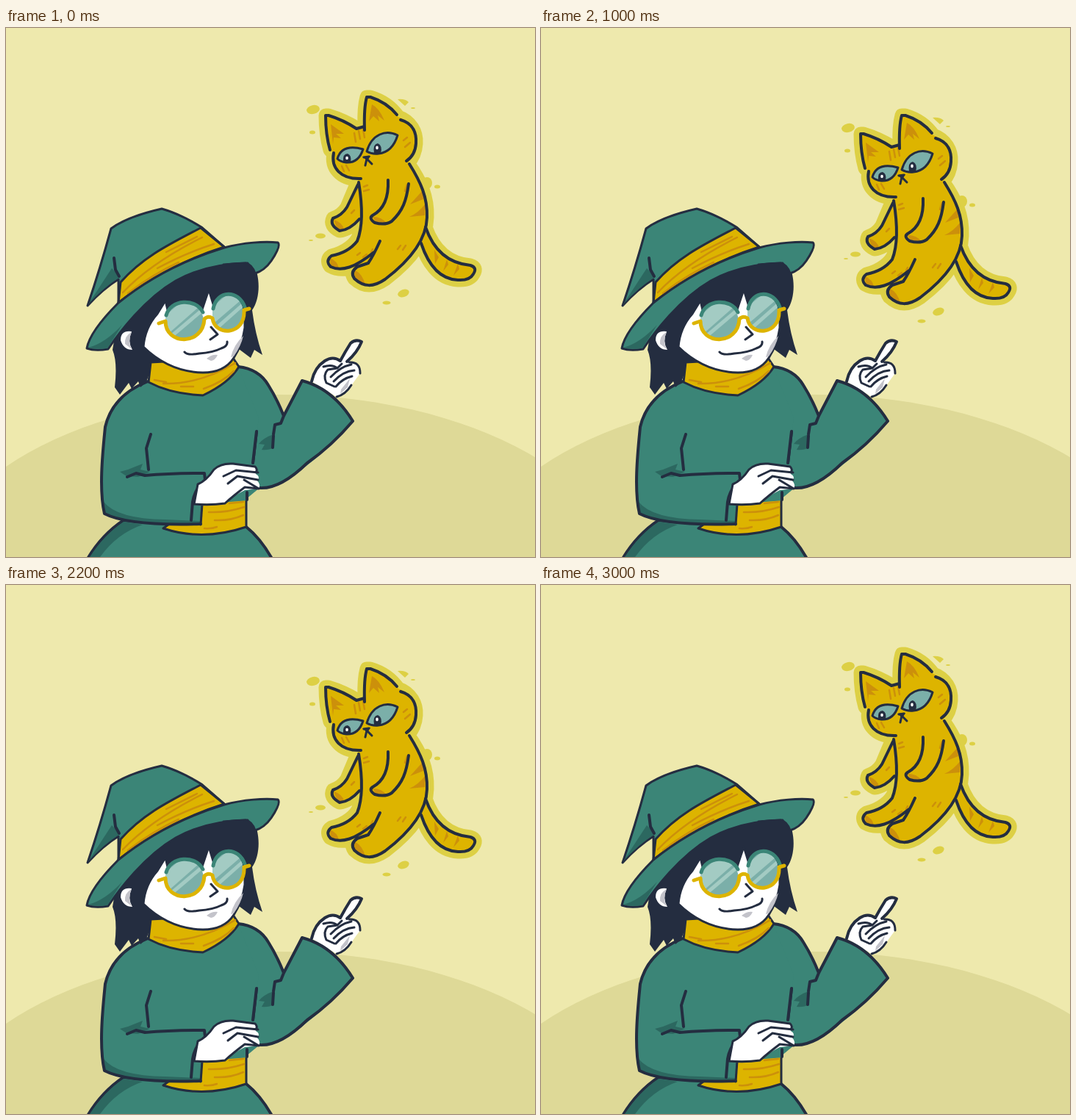
An HTML page for the animation above (3.2 s loop, 720 by 720 pixels).

```html
<!DOCTYPE html>
<html lang="en">
<head>
<meta charset="utf-8">
<title>Levitating cat</title>
<style>
  html, body { margin: 0; width: 100%; height: 100%; overflow: hidden; background: #eee9ad; }
  svg { display: block; width: 100%; height: 100%; }
  path, ellipse { stroke-linecap: round; stroke-linejoin: round; }
  .ink { stroke: #242d40; stroke-width: 4; }
  .line { fill: none; stroke: #242d40; stroke-width: 4; }
  .thin { stroke-width: 3; }
  .teal { fill: #3b8577; }
  .shade { fill: #2c6860; }
  .gold { fill: #ddb400; }
  .rust { fill: #cc900b; }
  .scratch { fill: none; stroke: #cc900b; stroke-width: 2.5; }
  .dark { fill: #242d40; }
  .white { fill: #fff; }
  .grey { fill: #c3c3ca; }
  .lens { fill: #7bafa9; }
  .glint { fill: none; stroke: #a3cbc3; }
  .rim { fill: none; stroke-width: 5; }
  .aura { fill: #ddd045; }
  .halo { stroke: #ddd045; stroke-width: 19; }
  #cat { animation: float 3.2s step-end infinite; }
  @keyframes float {
    0%, 93.75%, 100% { transform: translateY(0); }
    6.25%, 87.5% { transform: translateY(4px); }
    12.5%, 81.25% { transform: translateY(8px); }
    18.75%, 75% { transform: translateY(15px); }
    25%, 68.75% { transform: translateY(20px); }
    31.25%, 62.5% { transform: translateY(25px); }
    37.5%, 56.25% { transform: translateY(30px); }
    43.75% { transform: translateY(35px); }
  }
</style>
</head>
<body>
<svg viewBox="0 0 720 720">
  <defs>
    <g id="silhouette">
      <path d="M441 166Q435 145 435 119L439 119Q459 125 477 136L488 134Q487 108 491 94L496 94Q520 101 534 121C551 127 559 142 558 157Q557 173 547 184C565 209 574 230 573 258C572 292 545 320 516 342C500 353 487 353 474 341Q468 333 476 325Q455 332 441 324Q435 315 443 310C461 306 477 294 481 281L483 259Q466 275 454 276Q440 269 445 259Q457 255 464 244L480 206C455 206 442 190 446 170Z"/>
      <path d="M571 271C580 297 598 320 632 323Q642 326 636 335Q631 344 615 343C588 342 573 317 565 293Z"/>
    </g>
    <clipPath id="leftLens"><ellipse cx="243" cy="399" rx="26" ry="25"/></clipPath>
    <clipPath id="rightLens"><ellipse cx="302" cy="388" rx="21" ry="25"/></clipPath>
  </defs>

  <path fill="#eee9ad" d="M0 0H720V720H0Z"/>
  <ellipse cx="370" cy="769" rx="480" ry="270" fill="#ded997"/>

  <!-- skirt and belt -->
  <path class="teal ink" d="M110 724Q130 690 160 670L327 679Q347 695 363 724Z"/>
  <path class="shade" d="M114 720Q133 690 160 672L186 676Q151 688 128 720Z"/>
  <path class="gold ink thin" d="M214 681L262 646L327 641L327 679Q268 699 214 681Z"/>
  <path class="scratch" d="M276 659Q300 660 324 652M284 670Q305 671 323 663M270 681Q280 682 287 679M304 647L323 645"/>

  <!-- raised arm -->
  <path class="white" d="M416 481Q420 462 434 453Q445 446 455 453Q462 440 469 429Q476 423 484 427Q478 442 467 454Q482 453 482 470Q476 478 469 488Q462 499 450 502Z"/>
  <path class="grey" d="M456 492L468 477L465 489L455 498Z"/>
  <path class="line" d="M416 481Q420 462 434 453Q445 446 455 453Q462 440 469 429Q476 423 484 427Q478 442 464 454"/>
  <path class="line thin" d="M467 455Q482 454 482 470M470 486Q462 499 450 502M432 461Q444 457 451 463L457 457M451 463L438 465Q431 472 436 483L447 488M442 475Q455 461 470 458M446 481Q459 467 474 466M449 488Q458 477 471 474"/>
  <path class="teal" d="M316 461Q344 464 357 486Q369 505 378 528L403 480Q445 491 472 535Q440 573 405 599Q369 628 345 626L327 641L252 646Z"/>
  <path class="line" d="M316 461Q344 464 357 486Q369 505 378 528L374 538L366 540L364 553M378 528L403 480Q445 491 472 535Q443 569 410 592Q373 628 345 626"/>
  <path class="shade" d="M364 553Q350 558 344 566L352 567L348 574Q358 575 364 571Z"/>
  <path class="line" d="M364 555L363 571M341 549L336 592"/>

  <!-- torso and folded arm -->
  <path class="teal" d="M193 481L316 461L344 530L336 601L329 643L267 648L265 676C167 678 146 665 134 661C126 627 132 574 135 543Q145 500 193 481Z"/>
  <path class="shade" d="M133 645Q151 668 217 669L264 671V676Q161 676 134 661Z"/>
  <path class="line" d="M193 481Q145 500 135 543C132 574 126 627 134 661Q167 678 265 675M341 549L336 592M328 632V642"/>
  <path class="shade" d="M155 604L166 601L186 593L183 601L196 604L180 611L164 610Z"/>
  <path class="line" d="M197 553L191 572L194 601M165 611L177 606L189 609Q225 606 270 606L271 615Q257 627 254 645L252 670"/>
  <path class="line thin" d="M267 648L265 676"/>

  <path class="white" d="M256 648L261 621Q273 616 283 601Q292 592 309 593L339 597Q343 601 340 607Q347 611 342 616Q347 622 344 627L325 629Q309 637 298 647Z"/>
  <path class="line thin" d="M256 648L261 621Q273 616 283 601Q292 592 309 593L339 597Q343 601 340 605M344 627L325 625Q309 637 298 647Q278 650 256 648M343 605L313 602L296 610M343 615L315 610L302 620M344 627L324 615"/>

  <!-- hair, scarf and face -->
  <path class="dark" d="M148 420Q160 395 198 354Q238 314 336 320C346 336 347 367 335 384Q339 416 349 445L338 438L333 449L313 434L197 465L191 482L183 489L180 481L171 491L167 483L155 499L148 489Q152 455 145 438Z"/>
  <path class="gold ink thin" d="M197 455L194 482Q224 498 268 500Q304 483 317 461L309 449Z"/>
  <path class="scratch" d="M214 484Q264 485 312 456M269 491Q295 482 310 467M202 479L218 482M238 488L255 488"/>
  <path class="white" d="M171 413Q156 411 156 425Q160 438 172 438Q165 427 171 413Z"/>
  <path class="grey" d="M171 414Q161 419 162 430L171 437Q165 427 171 414Z"/>
  <path class="white ink thin" d="M187 434Q189 408 206 389L217 371L220 384L267 383L276 356L283 379L325 384L325 408Q322 430 310 449Q297 469 268 469Q222 468 187 434Z"/>
  <path class="grey" d="M323 419Q320 433 310 447L306 448Q310 431 323 419ZM273 450Q280 444 288 445Q285 452 279 453Z"/>
  <path class="line thin" d="M279 407L288 417L278 424M243 441Q247 446 263 443Q281 442 293 436Q302 433 301 427"/>

  <!-- glasses -->
  <g clip-path="url(#leftLens)">
    <path class="lens" d="M214 370H272V428H214Z"/>
    <path class="glint" stroke-width="21" d="M213 409L261 367"/>
    <path class="glint" stroke-width="5" d="M228 417L273 379"/>
  </g>
  <g clip-path="url(#rightLens)">
    <path class="lens" d="M277 360H328V418H277Z"/>
    <path class="glint" stroke-width="18" d="M276 396L318 360"/>
    <path class="glint" stroke-width="5" d="M287 408L329 371"/>
  </g>
  <path class="rim" stroke="#3b8577" d="M218 391C224 369 258 367 268 387M282 382C287 356 317 356 325 380"/>
  <path class="rim" stroke="#ddb400" d="M208 402L217 399C217 432 268 433 270 396Q275 391 281 395C284 420 326 419 324 384L331 382"/>

  <!-- hat -->
  <path class="teal ink thin" d="M153 374L153 342Q132 355 111 378Q128 328 143 273Q164 257 212 246Q237 253 266 271L297 298Z"/>
  <path class="shade" d="M112 376L144 327L155 339Q134 352 112 376Z"/>
  <path class="line" d="M147 313L149 329L154 338"/>
  <path class="gold ink thin" d="M153 374L156 346C187 311 223 294 265 272L297 298Q215 324 153 374Z"/>
  <path class="scratch" stroke-width="4" d="M159 360Q197 320 267 285M166 361Q200 335 235 319M206 327Q245 306 283 294M218 305Q244 292 260 284"/>
  <path class="teal ink thin" d="M153 374Q215 324 297 299C323 292 352 290 370 292Q375 296 361 317Q352 330 339 334Q335 322 326 320C290 321 258 329 231 344C188 369 153 416 139 437Q121 440 110 436Q114 413 153 374Z"/>
  <path class="shade" d="M112 435Q135 429 158 404L138 436Q123 438 112 435Z"/>
  <path class="line thin" d="M296 322Q317 320 329 320"/>

  <!-- floating cat -->
  <g id="cat">
    <g class="aura">
      <use href="#silhouette" class="halo"/>
      <ellipse cx="418" cy="111" rx="9" ry="6" transform="rotate(-12 418 111)"/>
      <ellipse cx="417" cy="142" rx="4" ry="2.5"/>
      <path d="M533 97Q543 96 548 101L543 106Z"/>
      <ellipse cx="554" cy="109" rx="3" ry="1"/>
      <ellipse cx="573" cy="211" rx="7" ry="8"/>
      <ellipse cx="587" cy="216" rx="4" ry="2.5"/>
      <ellipse cx="428" cy="283" rx="7" ry="3.5"/>
      <ellipse cx="415" cy="289" rx="3" ry="1"/>
      <ellipse cx="541" cy="361" rx="8" ry="5" transform="rotate(-20 541 361)"/>
      <ellipse cx="518" cy="374" rx="5.5" ry="2.5"/>
    </g>
    <use href="#silhouette" class="gold"/>
    <g class="rust">
      <path d="M442 131L460 144L449 144L456 150L446 149L445 158ZM498 104Q508 109 515 126L506 119L508 127L500 120L494 127Z"/>
      <path d="M568 220L550 240L568 233ZM571 239Q561 252 549 257L570 255Z"/>
      <path d="M446 261Q457 264 461 275L452 276ZM499 257Q512 257 518 266L503 264ZM441 313Q451 317 453 327L442 323ZM474 329Q486 335 489 350L475 342Z"/>
      <path d="M583 302L589 312L584 321ZM600 315L602 322L595 331ZM615 321L617 328L609 337Z"/>
    </g>
    <path class="scratch" d="M474 143L476 155M480 140L482 151M486 138L488 149M457 188L460 195M463 187L467 194M541 153L546 149M543 162L550 156M487 216L492 214M487 222L494 220M546 213L543 222M533 301L537 296M540 302L544 296M478 309L482 306M486 312L491 308M497 305L499 301M470 252L474 248"/>
    <path class="lens ink thin" d="M451 178Q457 157 486 165Q480 184 463 183Q455 182 451 178ZM491 168C498 144 517 138 533 146Q526 169 507 171Q498 172 491 168Z"/>
    <path class="dark" d="M459 182Q458 171 465 171Q471 174 469 182ZM501 170Q499 158 506 157Q513 160 510 171ZM485 175L496 174L492 181Z"/>
    <ellipse class="white" cx="464" cy="177" rx="1.8" ry="2.2"/>
    <ellipse class="white" cx="505" cy="163" rx="1.8" ry="2.4"/>
    <path class="line thin" d="M487 176L494 175M491 178L489 187M492 179L498 185"/>
    <path class="line" d="M441 166Q435 145 435 119L439 119Q459 125 477 137L488 134M488 139Q487 108 491 94L496 94Q518 101 532 118M537 125C555 130 559 144 558 157Q557 173 545 181M446 170C442 190 455 206 483 205"/>
    <path class="line" d="M480 210C485 240 486 270 478 290C467 304 454 308 443 310Q434 317 442 325C457 332 475 326 501 305M509 290Q500 310 493 320L478 325Q468 332 474 341C487 353 500 353 516 342C545 320 572 292 573 258C574 230 564 209 549 185"/>
    <path class="line" d="M479 213L464 244Q457 255 445 259Q440 268 454 276Q468 275 481 260M520 207C521 230 514 247 499 255Q493 259 502 265Q516 269 525 263C540 249 545 235 548 212M571 271C580 297 598 320 632 323Q642 326 636 335Q631 344 615 343C588 342 573 317 565 293"/>
  </g>
</svg>
</body>
</html>
```
